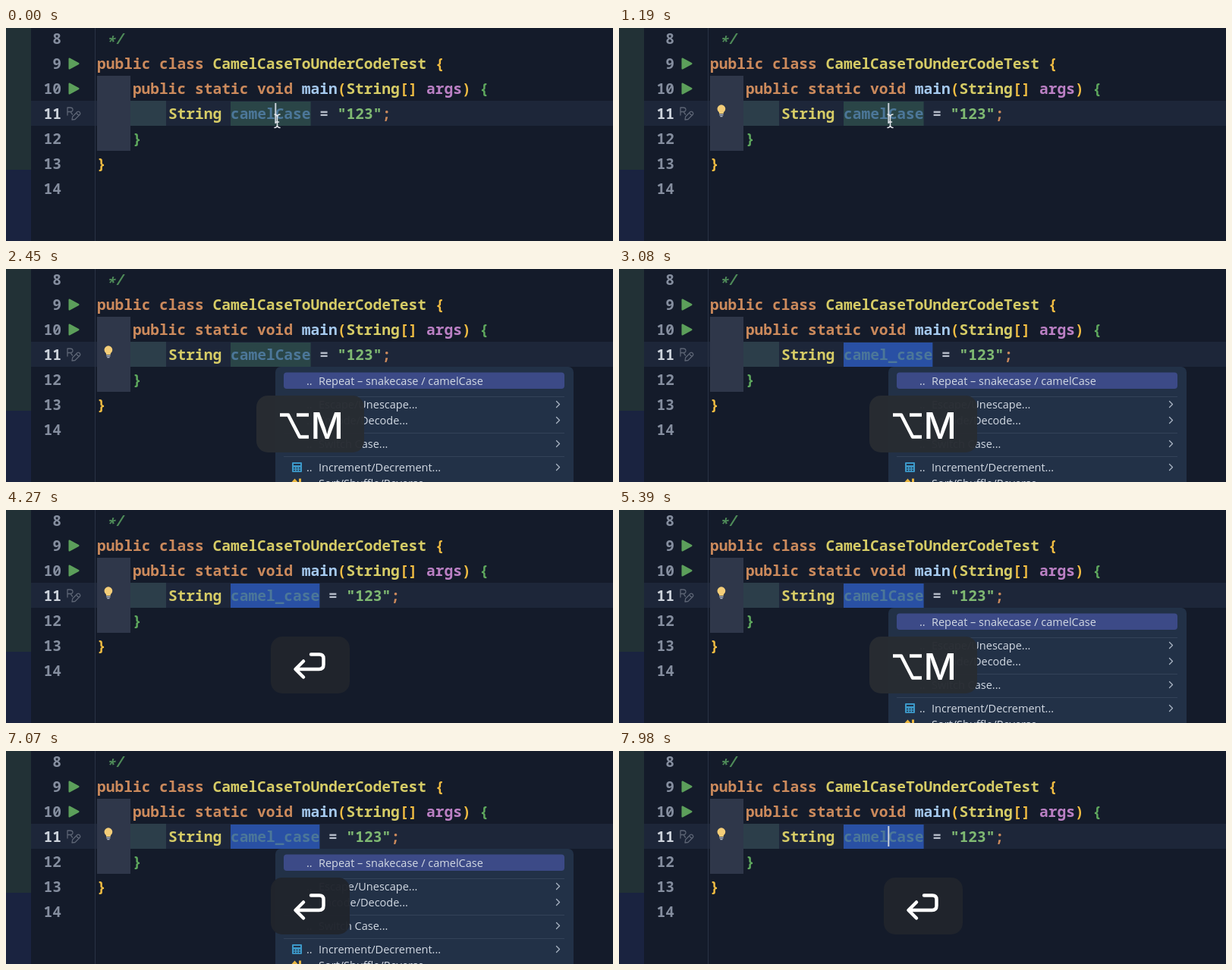
An HTML page that plays this animation: 800x281 px, repeating every 8000 ms.

```html
<!DOCTYPE html>
<html lang="en">
<head>
<meta charset="utf-8">
<title>Switching case in an editor</title>
<style>
  html, body { margin: 0; width: 100%; height: 100%; overflow: hidden; background: #141b2a; }
  svg { display: block; width: 800px; height: 281px; }
  text { white-space: pre; }
  .code text { font: 600 19.56px "Noto Sans Mono", "DejaVu Sans Mono", monospace; fill: #b4bbc8; }
  .code .num { fill: #858e9f; text-anchor: end; }
  .code .now { fill: #cdd3dc; }
  .kw { fill: #cc8a5c; }
  .type { fill: #d6cc66; font-weight: 700; }
  .code .gold { fill: #f2bd42; }
  .code .green { fill: #5fa95e; }
  .str { fill: #7fb972; }
  .fn { fill: #a5c9ee; }
  .arg { fill: #bb80c4; }
  .var { fill: #4c7799; }
  .code .note { fill: #4f8c59; font-style: italic; }
  .menu text { font: 500 14.5px "Open Sans", "Noto Sans", sans-serif; fill: #d3dae4; }
  .line { fill: none; stroke-linecap: round; stroke-linejoin: round; }
</style>
</head>
<body>
<svg viewBox="0 0 800 281">
  <rect width="800" height="281" fill="#141b2a"/>
  <rect width="33" height="187" fill="#223136"/>
  <rect y="187" width="33" height="94" fill="#1a2340"/>
  <rect x="33" y="96" width="767" height="33" fill="#1d2639"/>
  <path d="M117.5 0V281" stroke="#293244"/>
  <rect x="120" y="63" width="44" height="99" fill="#2f374a"/>
  <rect x="164" y="96" width="47" height="33" fill="#2c3e4a"/>
  <rect id="mark" x="296" y="97" height="32"/>

  <g class="code">
    <g id="nums"></g>
    <text class="note" x="131.7" y="25">*</text>
    <text class="note" x="143.5" y="21">/</text>
    <text x="120" y="54"><tspan class="kw">public class </tspan><tspan class="type">CamelCaseToUnderCodeTest</tspan><tspan class="gold"> {</tspan></text>
    <text x="166.9" y="87"><tspan class="kw">public static void </tspan><tspan class="fn">main</tspan><tspan class="gold">(</tspan><tspan class="type">String</tspan><tspan class="gold">[]</tspan><tspan class="arg"> args</tspan><tspan class="gold">)</tspan><tspan class="green"> {</tspan></text>
    <text x="213.9" y="120"><tspan class="type">String </tspan><tspan class="var" id="name"></tspan> = <tspan class="str">"123"</tspan><tspan class="kw">;</tspan></text>
    <text class="green" x="166.9" y="153">}</text>
    <text class="gold" x="120" y="186">}</text>
  </g>

  <path d="M83.5 40.5L95.500 47L83.500 53.500ZM83.500 73.500L95.500 80L83.500 86.500Z" fill="#5c9f5b" stroke="#5c9f5b" stroke-width="2" stroke-linejoin="round"/>
  <g class="line" stroke="#5d6575" stroke-width="1.3">
    <path d="M81 115V105H84.500Q88 105 88 107.700T84.500 110.500H81M85 110.500L87.500 114"/>
    <path d="M87 121L87.700 117L94 110.500Q95.500 109.500 97 111T97.500 114L91 120.500ZM92.500 112L96 115.500"/>
  </g>

  <g id="bulb">
    <path d="M132 111.500Q129.500 109.500 129.500 106.700A5.400 5.400 0 0 1 140.300 106.700Q140.300 109.500 137.800 111.500V113H132Z" fill="#f4cd78"/>
    <path d="M132.300 114.500H137.500M133.300 116.700H136.500" stroke="#b9c0ca" stroke-width="1.3"/>
  </g>
  <path id="caret" d="M355.3 99V126" stroke="#c9d0da" stroke-width="2"/>
  <path id="mouse" class="line" d="M354 114Q357 114 357.5 117Q358 114 361 114M357.5 116V129M354 131.5Q357 131.5 357.5 128.5Q358 131.5 361 131.5M355.5 124H359.5" stroke="#e6e9ee" stroke-width="1.5"/>

  <g id="menu" class="menu">
    <rect x="355" y="129" width="393" height="170" rx="7" fill="#223147"/>
    <rect x="366" y="136.5" width="370" height="21.5" rx="4" fill="#3c4a87"/>
    <path d="M366 168.500H736M366 216.500H736M366 247.500H736" stroke="#334259"/>
    <g id="rows"></g>
    <rect x="377" y="255" width="13" height="13" rx="1" fill="#3c98c8"/>
    <path d="M379 258H388" stroke="#223147" stroke-width="2"/>
    <path d="M379 262.500H388M379 265.500H388" stroke="#223147" stroke-width="1.5" stroke-dasharray="2 1.5"/>
    <path d="M376.500 281L380.500 276.500L384.500 281ZM386 276.500H389V281H386Z" fill="#e9b63f"/>
  </g>

  <g id="combo">
    <rect x="330" y="167" width="142" height="75" rx="15" fill="#282c32" fill-opacity=".97"/>
    <path d="M361 192.500H372L387 221.500H399M383 192.500H399" fill="none" stroke="#fff" stroke-width="4.5" stroke-linejoin="round"/>
    <text x="401.500" y="224" font-family="Inter, sans-serif" font-size="47.5" font-weight="550" fill="#fff">M</text>
  </g>
  <g id="enter">
    <rect x="349" y="167" width="104" height="75" rx="15" fill="#20252d" fill-opacity=".97"/>
    <path class="line" d="M402 190.500H413Q418.500 190.500 418.500 196V204Q418.500 210 412.500 210H382M392 199.500L381.500 210L392 220.500" stroke="#fff" stroke-width="4.5"/>
  </g>
</svg>
<script>
const LOOP = 8000, CHAR = 11.736, KEY_LEAD = 70, BULB_DELAY = 210;
// Each use of the menu: opened at, confirmed at (ms)
const uses = [[1540, 2660], [2800, 3360], [3570, 3990], [4550, 4830], [5110, 5670], [6440, 7140]];
const $ = id => document.getElementById(id);
const show = (id, on) => $(id).style.display = on ? "" : "none";

for (let n = 8; n <= 14; n++) {
  $("nums").innerHTML += `<text class="num ${n === 11 ? "now" : ""}" x="73" y="${21 + 33 * (n - 8)}">${n}</text>`;
}

const rows = [
  ["Repeat – snakecase / camelCase", 147.5], ["Escape/Unescape...", 179, 1], ["Encode/Decode...", 200, 1],
  ["Switch Case...", 231, 1], ["Increment/Decrement...", 262, 1], ["Sort/Shuffle/Reverse...", 283]
];
$("rows").innerHTML = rows.map(([label, y, arrow]) =>
  `<text x="396" y="${y + 5}">..</text><text x="412" y="${y + 5}">${label}</text>` +
  (arrow ? `<path class="line" d="M725.5 ${y - 4.5}l4 4l-4 4" stroke="#a9b4c3" stroke-width="1.3"/>` : "")
).join("");

function draw(t) {
  const done = uses.filter(u => t >= u[1]).length;
  const last = done ? uses[done - 1][1] : 490;
  const [open, close] = uses[done] || [Infinity, Infinity];
  const name = done % 2 ? "camel_case" : "camelCase";
  const menu = t >= open;
  const combo = t >= open - KEY_LEAD && t < close - KEY_LEAD;

  if ($("name").textContent !== name) $("name").textContent = name;
  $("mark").setAttribute("width", name.length * CHAR);
  $("mark").setAttribute("fill", done ? "#2950a4" : "#2a4547");
  show("menu", menu);
  show("combo", combo);
  show("enter", !combo && (done || menu));
  show("bulb", Math.min(t, open) - last >= BULB_DELAY);
  show("caret", !menu && (t - last + 1000) % 1000 >= 500);
  show("mouse", t < uses[0][0] - KEY_LEAD);
}

function tick() {
  draw(performance.now() % LOOP);
  requestAnimationFrame(tick);
}
tick();
</script>
</body>
</html>
```
